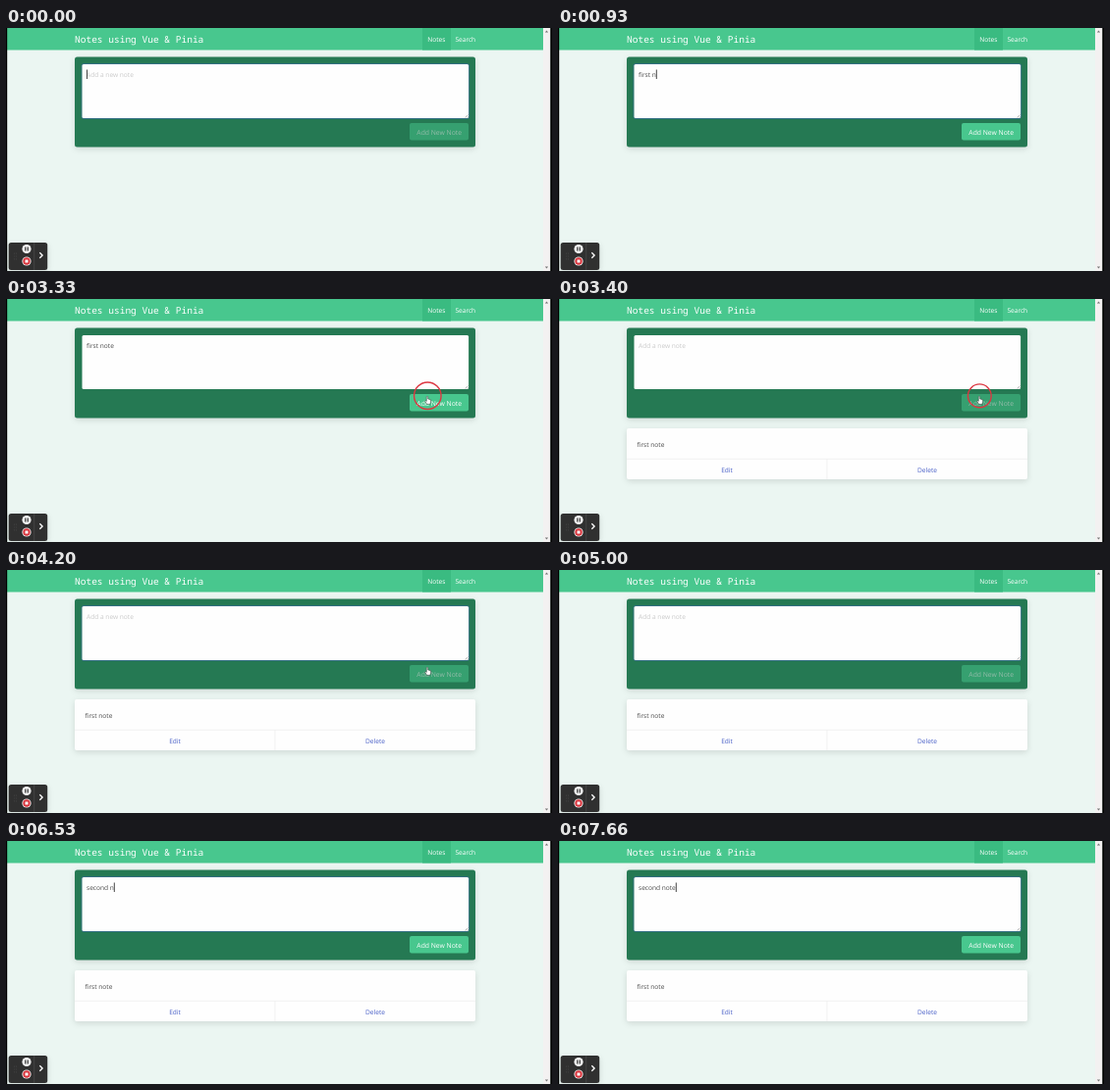
These frames come from a looping animation (556x248 px, 8 s). An HTML page:

```html
<!DOCTYPE html>
<html lang="en">
<head>
<meta charset="utf-8">
<title>Notes</title>
<style>
html, body { margin: 0; width: 100%; height: 100%; overflow: hidden; background: #ebf6f2; }
svg { display: block; width: 556px; height: 248px; }
text { font: 6.6px "Open Sans", "Noto Sans", sans-serif; fill: #4a4a4a; white-space: pre; text-rendering: geometricPrecision; }
.title { font: 9.52px "Noto Sans Mono", "DejaVu Sans Mono", monospace; }
.light { fill: #fff; }
.link { fill: #485fc7; text-anchor: middle; }
.shadow { filter: drop-shadow(0 2px 3px rgba(10, 10, 10, .12)); }
</style>
</head>
<body>
<svg viewBox="0 0 556 248">
  <rect width="556" height="248" fill="#ebf6f2"/>
  <rect width="547" height="22.5" fill="#48c78e"/>
  <rect x="424" width="29" height="22.5" fill="#3abb81"/>
  <text class="title light" x="70" y="15">Notes using Vue &amp; Pinia</text>
  <text class="light" x="429.3" y="14.3">Notes</text>
  <text class="light" x="457.4" y="14.3">Search</text>

  <rect class="shadow" x="70" y="29.5" width="408" height="92" rx="2.5" fill="#257953"/>
  <rect id="focus" x="77" y="36.5" width="394.6" height="56" rx="2" fill="none" stroke="#485fc7" stroke-opacity=".4"/>
  <rect x="77.5" y="37" width="393.6" height="55" rx="1.5" fill="#fefefe"/>
  <path d="M467.5 91.5l3-3M469.3 91.5l1.2-1.2" stroke="#777" stroke-width=".5"/>
  <text id="hint" x="82" y="50" style="fill:#c9c9c9">Add a new note</text>
  <text id="draft" x="82" y="50"></text>
  <rect id="caret" y="42.5" width=".9" height="9.5" fill="#333"/>
  <g id="button">
    <rect x="411" y="97" width="60" height="17.5" rx="2" fill="#48c78e"/>
    <text class="light" x="441.2" y="108.7" text-anchor="middle" style="font-size:6.8px">Add New Note</text>
  </g>

  <g id="note">
    <rect class="shadow" x="70" y="132" width="408" height="52" rx="2" fill="#fefefe"/>
    <path d="M70 163.3H478M274 163.3V184" stroke="#ededed" stroke-width=".7"/>
    <text x="80.5" y="150.5">first note</text>
    <text class="link" x="172" y="176.8">Edit</text>
    <text class="link" x="376" y="176.8">Delete</text>
  </g>

  <rect x="547" width="7" height="248" fill="#f3f1f1"/>
  <path d="M548.8 4.5l1.7-2 1.7 2zM548.8 243.5l1.7 2 1.7-2z" fill="#777"/>
  <path d="M0 0H1.2V248H0zM554.3 0H556V248H554.3z"/>

  <g class="shadow">
    <rect x="2.7" y="219" width="39.5" height="28" rx="2.5" fill="#303030"/>
    <path d="M8 230.2h.1m2.4 0h.1M8 233h.1m2.4 0h.1M8 235.8h.1m2.4 0h.1" stroke="#ccc" stroke-width="1.2"/>
    <circle cx="21" cy="225.5" r="4.6" fill="#f4f4f4"/>
    <path d="M19.8 223.5v4M22.2 223.5v4" stroke="#303030" stroke-width="1.2"/>
    <circle cx="21" cy="238" r="4.6" fill="#f4f4f4"/>
    <circle cx="21" cy="238" r="3.7" fill="#d9343c"/>
    <rect x="19.5" y="236.5" width="3" height="3" fill="#fff"/>
    <path d="M28.7 219V247" stroke="#555" stroke-width=".6"/>
    <path d="M34.3 229.2l2.8 2.8-2.8 2.8" fill="none" stroke="#fff" stroke-width="1.3"/>
  </g>

  <circle id="ring" cx="429.3" cy="98.8" fill="none" stroke="#dc3741" stroke-width="1.4"/>
  <g id="pointer" stroke="#333" stroke-width=".5" stroke-linejoin="round" fill="#fff">
    <path id="arrow" d="M0 0V6.6L1.6 5.2 2.7 7.7 3.8 7.2 2.7 4.8H4.9Z"/>
    <path id="hand" d="M-.7 .8Q0-.3 .7 .8V3.2L3.6 4V6.3L2.9 8.5H-.4L-2.2 5.6-1.7 4.9-.7 5.6Z"/>
  </g>
</svg>
<script>
const $ = id => document.getElementById(id);
const show = (id, on) => $(id).setAttribute("visibility", on ? "visible" : "hidden");

const firstKeys = [200, 330, 460, 530, 660, 800, 930, 1000, 1260, 1460];
const secondKeys = [5460, 5600, 5800, 5930, 6060, 6200, 6400, 6530, 6600, 6730, 6800];
const caretOn = [[0, 2000], [2530, 3060], [3530, 4060], [4530, 5000], [5460, 7200], [7660, 8000]];
const path = [[2000, 318, 250], [2200, 342, 107], [2800, 429, 98.8], [4460, 429, 98.8], [4930, 440, 250]];
const ADDED = 3400, CLICK = 3330, RING_END = 3660;

const typed = (text, keys, t) => text.slice(0, keys.filter(k => k <= t).length);

function pointerAt(t) {
  const i = path.findIndex(p => t < p[0]);
  if (i < 1) return null;
  const [t0, x0, y0] = path[i - 1], [t1, x1, y1] = path[i];
  const k = (t - t0) / (t1 - t0);
  return [x0 + (x1 - x0) * k, y0 + (y1 - y0) * k];
}

function draw(now) {
  const t = now % 8000;
  const text = t < ADDED ? typed("first note", firstKeys, t) : typed("second note", secondKeys, t);
  $("draft").textContent = text;
  show("hint", !text);
  $("button").setAttribute("opacity", text ? 1 : .5);
  show("note", t >= ADDED);
  show("focus", t < CLICK || t >= 3460);

  $("caret").setAttribute("x", 82 + (text ? $("draft").getComputedTextLength() : 0));
  show("caret", caretOn.some(([a, b]) => t >= a && t < b));

  const ringing = t >= CLICK && t < RING_END;
  show("ring", ringing);
  if (ringing) {
    const age = t - CLICK;
    $("ring").setAttribute("r", Math.max(0, 13.8 - age * .027));
    $("ring").setAttribute("opacity", Math.min(1, (RING_END - t) / 200));
  }

  const p = pointerAt(t);
  const over = p && p[0] > 411 && p[0] < 471 && p[1] > 97 && p[1] < 114.5;
  show("arrow", p && !over);
  show("hand", over);
  if (p) $("pointer").setAttribute("transform", `translate(${p})`);
  requestAnimationFrame(draw);
}
requestAnimationFrame(draw);
</script>
</body>
</html>
```
